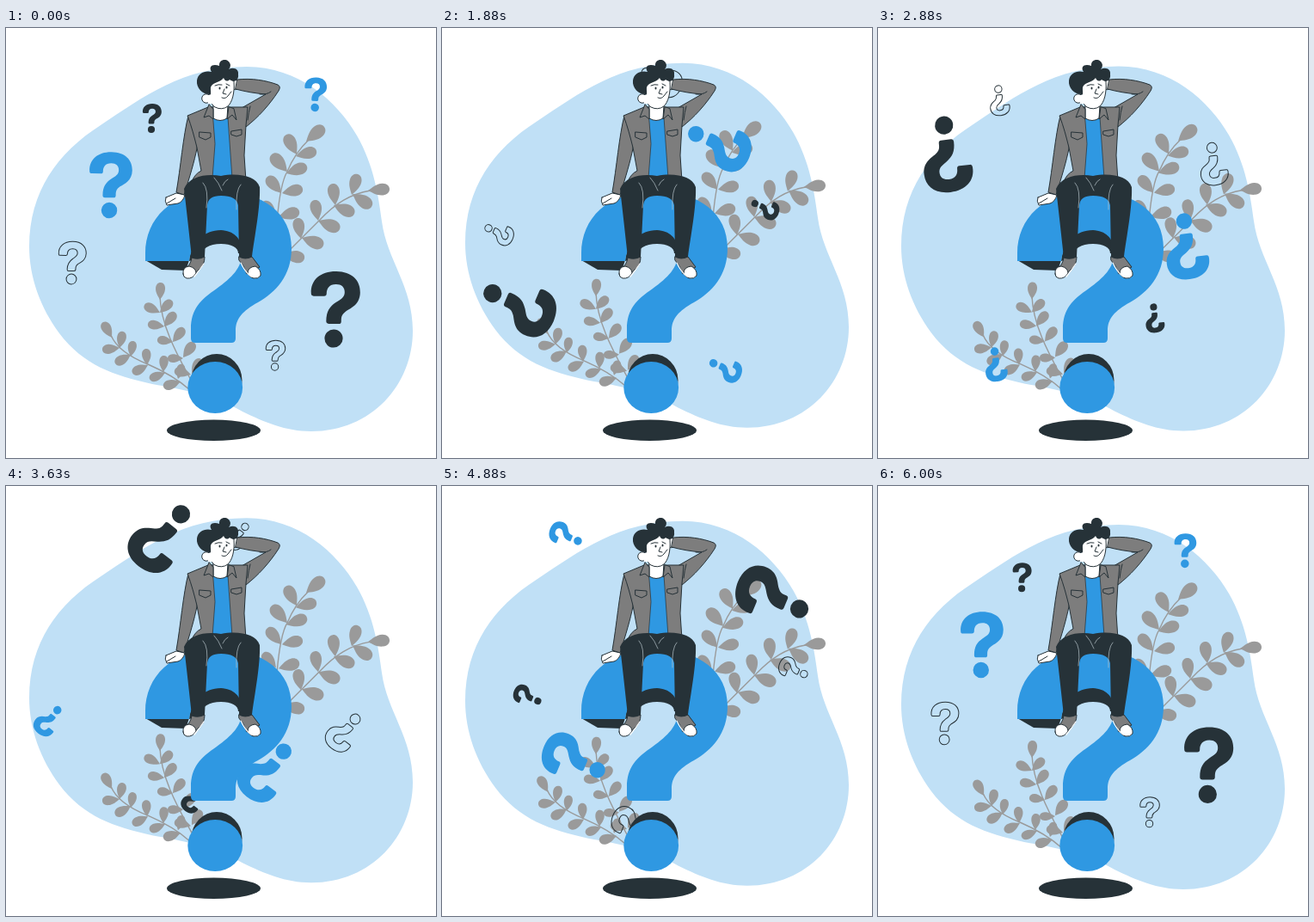
Write an HTML page with a canvas that moves like this. It is 500 px wide and 500 px high and loops after 6.04 s.

```html
<!DOCTYPE html>
<html lang="en">
<head>
<meta charset="utf-8">
<title>Pondering</title>
<style>
html, body { margin: 0; width: 100%; height: 100%; overflow: hidden; background: #fff; }
canvas { display: block; width: 500px; height: 500px; }
</style>
</head>
<body>
<canvas id="stage"></canvas>
<script>
const LOOP = 6040, FPS = 24, LAST = 144;
const TURN = 2.493 * Math.PI / 180; // orbit per step
const BOB_STEPS = 36, BOB = 8.4;
const HUB = [237.5, 226.5];
const BLUE = '#2f98e2', PALE = '#c0e0f6', DARK = '#263238', GREY = '#7d7d7d', LEAF = '#9a9a9a', WHITE = '#fff';

const canvas = document.getElementById('stage');
const ctx = canvas.getContext('2d');
const ratio = window.devicePixelRatio || 1;
canvas.width = canvas.height = 500 * ratio;

function shape(d, fill, line, width = 1) {
  const path = typeof d === 'string' ? new Path2D(d) : d;
  if (fill) { ctx.fillStyle = fill; ctx.fill(path); }
  if (line) { ctx.strokeStyle = line; ctx.lineWidth = width; ctx.stroke(path); }
}

function oval(x, y, rx, ry, fill, line, width, tilt = 0) {
  const path = new Path2D();
  path.ellipse(x, y, rx, ry, tilt, 0, 2 * Math.PI);
  shape(path, fill, line, width);
}

const blob = new Path2D('M280 45C340 45 385 85 408 125C428 160 433 195 437 225C443 270 473 300 473 352C473 415 425 469 355 469C325 469 300 458 275 446C245 428 205 420 170 414C125 404 90 392 62 355C40 325 27 290 27 254C27 190 60 145 110 113C160 80 205 45 280 45Z');

// Each plant: stem path and leaves as [base x, base y, end x, end y]
const plants = [
  { stem: 'M315 225Q319 180 327 167Q336 145 352 130', leaves: [
    [349,132,370,115], [338,147,326,124], [337,149,361,143], [327,167,309,147], [326,169,350,161],
    [320,192,304,173], [321,192,345,187], [317,220,341,213], [314,219,299,202]] },
  { stem: 'M325 263L345 243L365 223C383 204 400 193 424 189', leaves: [
    [421,189,446,187], [402,194,409,170], [403,193,425,208], [383,206,380,181], [381,206,405,216],
    [363,224,359,200], [363,224,388,234], [343,245,339,221], [344,244,369,253], [322,263,347,268]] },
  { stem: 'M218 415C205 390 180 350 179 312', leaves: [
    [179,316,180,296], [179,331,161,322], [179,331,193,317], [184,347,165,344], [184,347,197,331],
    [194,365,176,362], [194,365,207,349], [206,384,188,384], [206,383,219,366],
    [215,403,196,398], [216,402,227,385]] },
  { stem: 'M214 421Q195 404 165 391C145 383 128 372 122 357', leaves: [
    [123,360,113,342], [132,372,112,374], [132,372,136,353], [145,380,127,390], [145,382,148,364],
    [165,392,147,401], [164,392,163,373], [185,401,167,408], [183,400,184,381],
    [203,411,183,417], [200,408,205,391]] }
];

const teardrop = new Path2D('M0 0C.2 -.12 .4 -.29 .68 -.28C.9 -.27 1.01 -.13 1 0C1 .14 .88 .26 .68 .27C.4 .28 .2 .12 0 0Z');

function drawLeaf([x, y, ex, ey]) {
  const size = Math.hypot(ex - x, ey - y);
  ctx.save();
  ctx.translate(x, y);
  ctx.rotate(Math.atan2(ey - y, ex - x));
  ctx.scale(size, size);
  shape(teardrop, LEAF);
  ctx.restore();
}

function drawBackdrop(lift) {
  ctx.save();
  ctx.translate(0, -lift);
  shape(blob, PALE);
  for (const plant of plants) {
    shape(plant.stem, null, LEAF, 1.4);
    plant.leaves.forEach(drawLeaf);
  }
  ctx.restore();
}

// Question mark with its origin at the centre of the dot
const glyph = new Path2D('M-27 -52C-28 -68 -16 -78 2 -78C20 -78 30 -68 30 -54C30 -40 20 -36 14 -32C9 -28 8.5 -26 8.5 -20Q8.5 -17 5.5 -17L-6 -17Q-9 -17 -9 -20C-9 -32 -5 -37 2 -42C8 -46 12 -48 12 -54C12 -60 8 -63 2 -63C-6 -63 -9 -58 -9 -52Q-9 -49 -12 -49L-24 -49Q-27 -49 -27 -52Z');
glyph.moveTo(10.6, 0);
glyph.arc(0, 0, 10.6, 0, 2 * Math.PI);

const marks = [
  { x: 381, y: 361, size: 1, fill: DARK },
  { x: 120, y: 212, size: .87, fill: BLUE },
  { x: 169, y: 118, size: .385, fill: DARK },
  { x: 359.2, y: 92.5, size: .45, fill: BLUE },
  { x: 76, y: 292, size: .56 },
  { x: 312.6, y: 394, size: .395 }
];

function drawMarks(angle) {
  ctx.save();
  ctx.translate(...HUB);
  ctx.rotate(angle);
  for (const m of marks) {
    ctx.save();
    ctx.translate(m.x - HUB[0], m.y - HUB[1]);
    ctx.rotate(.015);
    ctx.scale(m.size, m.size);
    shape(glyph, m.fill, m.fill ? null : DARK, 1 / m.size);
    ctx.restore();
  }
  ctx.restore();
}

function drawSeat() {
  oval(241.5, 467.8, 54.5, 12.2, DARK);
  shape('M162 270L213 270L209 282L181 281Z', DARK);
  shape('M213 271C215 250 228 235 250 234C268 234 276 245 277 262L270 262C270 255 262 251 250 251C236 251 228 256 224 268Z', DARK);
  shape('M162 271V262C162 222 192 190 247 190C300 190 332 216 332 256C332 288 314 307 293 319C275 329 267 338 267 352V361Q267 366 262 366H220Q215 366 215 361V350C215 327 226 316 245 303C263 290 274 279 275 261C274 243 264 236 250 235C230 235 216 249 213 271Z', BLUE);
  oval(245, 409.5, 29.5, 30.5, DARK);
  oval(243.2, 418, 31.9, 30, BLUE);
}

function drawMan() {
  // raised arm
  shape('M262 64Q265 59 270 61L271 71Q266 73 262 70Z', WHITE, DARK);
  shape('M269 60C285 58 303 61 316 66Q320 68 317 73C306 90 293 104 279 115L274 93L302 77C290 76 278 74 267 71Z', GREY, DARK);
  shape('M295 77Q303 78 308 74M284 91Q282 98 281 107', null, DARK);
  // propping arm
  shape('M186 197L198 192L208 194Q206 202 200 204L187 206Q184 201 186 197Z', WHITE, DARK);
  shape('M187 204L197 198', null, DARK);
  shape('M212 102C206 125 203 163 198 191L207 194C214 172 219 155 222 140L224 112Z', GREY, DARK);
  // jacket and shirt
  shape('M235 92L211 102C216 115 219 127 222 139L227 166Q219 170 216 179L279 178L277 148L279 113L281 92L262 92Z', GREY, DARK);
  shape('M241 104H258L263 175H240L243 135Z', BLUE, DARK, .7);
  shape('M241 88V105Q249 110 257 105L258 90Z', WHITE, DARK);
  shape('M236 89L230 104L236 102L241 106L241 95ZM259 92L257 106L263 101L268 107L265 94Z', GREY, DARK);
  shape('M225 121L238 122V127L232 130L225 127ZM262 120L274 118V124L268 126L262 124Z', GREY, DARK);
  // head
  shape('M238 66C235 80 238 89 243 92Q251 96 258 91C263 86 266 76 265 62L255 53L240 57Z', WHITE, DARK);
  oval(233, 82, 5.3, 5.2, WHITE, DARK, 1, .4);
  shape('M234 78H241V88H235Z', WHITE);
  shape('M238 77C229 78 221 70 222 61C223 53 231 49 239 51C235 45 240 41 248 44C247 36 259 34 261 43Q261 46 259 48C265 45 271 48 270 54C271 61 265 64 260 60C257 63 254 61 253 58C249 63 243 63 240 66C236 69 239 73 238 77Z', DARK);
  shape('M243 67Q247 65 251 66M256 65L260 67M254 71L252 76L256 77M251 81Q255 83 258 79L262 74', null, DARK);
  oval(248.5, 70, 1, 1.6, DARK);
  oval(256.5, 69, 1, 1.6, DARK);
  // trousers
  shape('M207 187C213 172 234 169 250 172C270 168 291 172 295 185C296 207 289 243 286 266Q279 271 271 266L270 206Q268 195 250 195Q235 195 234 206L231 266Q223 271 216 267C213 240 210 212 207 187Z', DARK);
  shape('M229 180Q236 187 233 209M251 189Q247 179 242 174M252 183Q254 178 258 176M268 211Q267 188 273 182', null, '#b8c4ca', .7);
  // shoes
  shape('M216 267Q223 270 231 266Q231 276 224 281L219 287L207 281Q215 276 216 267Z', GREY, DARK);
  shape('M206 286Q205 278 213 277Q221 279 221 285Q217 292 210 291Q206 290 206 286Z', WHITE, DARK);
  shape('M230 274Q224 283 219 289', null, WHITE, 1.2);
  shape('M271 266Q278 270 286 266L295 278L280 286Q276 275 271 270Z', GREY, DARK);
  shape('M281 285Q281 278 290 277Q297 281 296 288Q293 292 288 291Q283 290 281 285Z', WHITE, DARK);
  shape('M273 273Q278 284 285 289', null, WHITE, 1.2);
}

function draw(now) {
  const t = now % LOOP;
  const step = Math.min(LAST, Math.floor((t + 5) * FPS / 1000));
  const lift = BOB / 2 * (1 - Math.cos(2 * Math.PI * step / BOB_STEPS));
  ctx.setTransform(ratio, 0, 0, ratio, 0, 0);
  ctx.lineJoin = ctx.lineCap = 'round';
  ctx.clearRect(0, 0, 500, 500);
  drawBackdrop(lift);
  drawMarks(step * TURN);
  drawSeat();
  drawMan();
}

let start = null;
function tick(now) {
  if (start === null) start = now;
  draw(now - start);
  requestAnimationFrame(tick);
}
draw(0);
requestAnimationFrame(tick);
</script>
</body>
</html>
```
